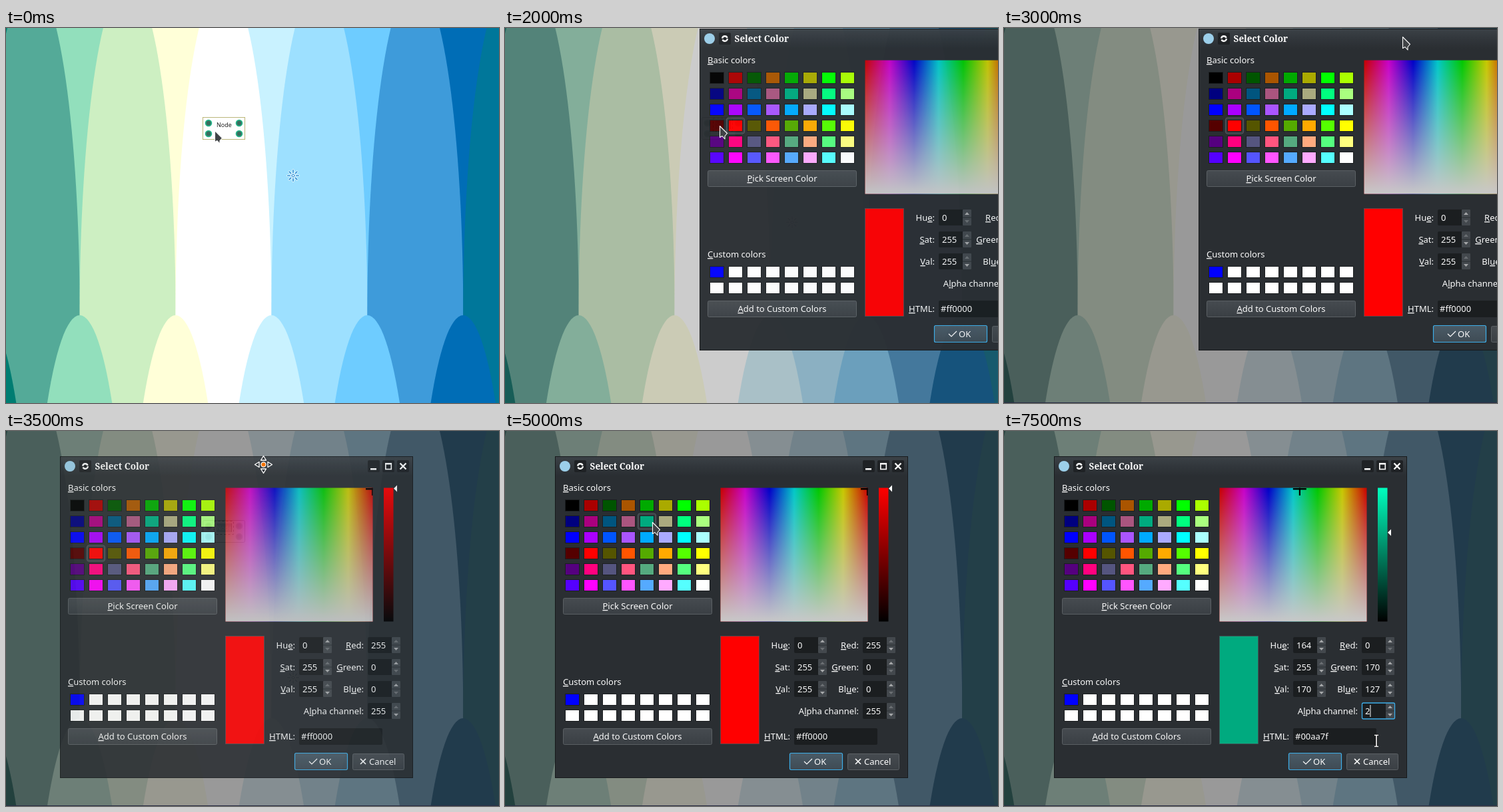
Animation, 740 px wide and 564 px high, one loop 8000 ms. Source, as an HTML page:

```html
<!DOCTYPE html>
<html>
<head>
<meta charset="utf-8">
<style>
  html, body { margin: 0; width: 100%; height: 100%; overflow: hidden; background: #fff; }
  svg { display: block; font: 13px "Noto Sans", sans-serif; }
  u, .u { text-decoration: underline; }
</style>
</head>
<body>
<svg id="stage" width="740" height="564" viewBox="0 0 740 564"></svg>
<script>
const stage = document.getElementById('stage');
const STEP = 500, STEPS = 16;
const TEXT = '#fcfcfc', EDGE = '#1b1e20', FOCUS = '#3daee9';

// Pointer for each step: x, y, kind
const pointers = [
  [313, 154], [313, 154], [318, 138], [322, 147], [322, 147], [622, 0],
  [598, 13], [386.5, 50.5, 'move'], [382, 50], [221, 137], [221, 137],
  [424, 503], [440, 543], [560, 421, 'beam'], [559, 466, 'beam'], [559, 466, 'beam']
];

const range = (n, f) => Array.from({ length: n }, (_, i) => f(i)).join('');
const rect = (x, y, w, h, fill, more = '') =>
  `<rect x="${x}" y="${y}" width="${w}" height="${h}" fill="${fill}" ${more}/>`;
const path = (d, fill, more = '') => `<path d="${d}" fill="${fill}" ${more}/>`;
const line = (d, color, width) => path(d, 'none', `stroke="${color}" stroke-width="${width}"`);
const circle = (x, y, r, fill, more = '') => `<circle cx="${x}" cy="${y}" r="${r}" fill="${fill}" ${more}/>`;
const group = (attrs, body) => `<g ${attrs}>${body}</g>`;
const gradient = (id, vertical, stops) =>
  `<linearGradient id="${id}" x2="${vertical ? 0 : 1}" y2="${vertical ? 1 : 0}">` +
  stops.map((c, i) => `<stop offset="${i / (stops.length - 1)}" stop-color="${c}"/>`).join('') +
  '</linearGradient>';

// "&" marks the underlined letter
const text = (x, y, s, anchor = 'start', more = '') =>
  `<text x="${x}" y="${y}" fill="${TEXT}" text-anchor="${anchor}" ${more}>` +
  s.replace(/&(.)/, '<tspan class="u">$1</tspan>') + '</text>';

function wallpaper() {
  const back = ['#007d72', '#92dfbc', '#ffffd8', '#c9f2ff', '#6eccff', '#006db6'];
  const front = ['#54aa98', '#cdefc2', '#ffffff', '#9de0ff', '#3e9bda', '#00779a'];
  const scale = (x, top, fill) =>
    path(`M${x - 72} 1000V${top + 502}A72 502 0 0 1 ${x + 72} ${top + 502}V1000Z`, fill);
  const row = (colors, x, top) => colors.map((c, i) => scale(x + 143.9 * i, top, c)).join('');
  return row(back, -33.3, -572) + row(front, 38.7, -70) + row(back, -33.3, 432);
}

function node(editing) {
  const frame = (stroke, more) => rect(295.5, 134.5, 63, 33, '#fff', `stroke="${stroke}" ${more}`);
  const dots = [304, 350].map(x => [143, 159].map(y =>
    circle(x, y, 4.4, '#386b5c', 'stroke="#23b68a" stroke-width="1.8"')).join('')).join('');
  const label = color => text(316, 149, 'Node', 'start', `style="font-size:9px;fill:${color}"`);
  if (!editing)
    return frame('#ffee00', '') + frame('#777', 'stroke-dasharray="1 1"') + dots + label('#222');
  return frame('#555', 'rx="2"') + dots +
    rect(312.5, 135.5, 29, 20, '#fff', 'stroke="#000" stroke-dasharray="3 3"') +
    rect(316, 139, 22, 13, FOCUS) + label('#fff') + rect(338, 139, 1, 13, '#000');
}

function spinner(y) {
  const petals = (color, width) => range(8, i =>
    `<path d="M0 -4.8V-8.2" stroke="${color}" stroke-width="${width}" stroke-linecap="round" transform="rotate(${i * 45})"/>`);
  return group(`transform="translate(431 ${y})"`,
    petals('#fff', 3.2) + petals('#2d8fd5', 1.7) +
    path('M0 -3.4L3.4 0L0 3.4L-3.4 0Z', '#2d8fd5', 'stroke="#fff" stroke-width=".8"') + circle(0, 0, 1.2, '#fff'));
}

function swatch(col, row, top, fill, selected) {
  const x = 101 + 28 * col, y = top + 24 * row;
  return (selected ? rect(x - 13.5, y - 12, 27, 24, '#3a4045', 'rx="3" stroke="#555b60"') : '') +
    rect(x - 10.5, y - 8.5, 21, 17, fill, `stroke="${EDGE}"`);
}

function basicColor(i) {
  const r = Math.floor(i / 3) % 4, g = Math.floor(i / 12), b = i % 3;
  return `rgb(${r * 85},${g * 85},${Math.floor(b * 127.5)})`;
}

const button = (x, y, w, h, more = 'stroke="#5b6064"') => rect(x + .5, y + .5, w - 1, h - 1, 'url(#button)', `rx="2" ${more}`);

function spinBox(label, right, y, value, max, focused) {
  const x = right ? 537 : 434;
  const arrow = (ay, d, on) => path(`M${x + 39} ${ay}h7l-3.5 ${d}z`, on ? '#a6a8aa' : '#6b6f73');
  return text(x - 6, y + 5, label, 'end') +
    rect(x, y - 12, 49, 24, EDGE, 'rx="2"') +
    rect(x + 36, y - 12, 13, 24, '#43484d', 'rx="1"') + rect(x + 36, y - .5, 13, 1, '#2a2e32') +
    arrow(y - 4, -4, value !== String(max)) + arrow(y + 4, 4, value !== '0') +
    (focused ? rect(x + .5, y - 12, 49, 24, 'none', `rx="2" stroke="${FOCUS}" stroke-width="1.3"`) +
      rect(x + 5 + 7.43 * value.length, y - 9, 1, 18, TEXT) : '') +
    text(x + 5, y + 5, value);
}

function titleBar() {
  const box = x => rect(x, 44, 18, 18, '#1f2225', 'rx="2"');
  return rect(76, 39, 528, 29, 'url(#title)') +
    circle(90, 53, 8, '#9ccfea') +
    box(104) + circle(113, 53, 3.8, 'none', 'stroke="#fff" stroke-width="2.4" stroke-dasharray="10 2"') +
    text(127.5, 58, 'Select Color', 'start', 'style="font:bold 13.5px \'Noto Serif\',serif"') +
    box(537) + box(559) + box(581) +
    rect(541, 56, 9, 2.5, '#fff') +
    rect(563.8, 49, 8.5, 8.5, 'none', 'stroke="#fff" stroke-width="1.6"') + rect(563, 48, 10, 2.5, '#fff') +
    line('M585.5 48.5l9 9m0-9l-9 9', '#fff', 2.4);
}

function picker(teal) {
  const x = teal ? 443.8 : 544, mark = teal ? 152.7 : 86.5;
  return rect(323.5, 85.5, 221, 201, 'url(#hue)') + rect(323.5, 85.5, 221, 201, 'url(#grey)') +
    group('clip-path="url(#pickClip)"', rect(x - 10, 86, 20, 2.4, '#000') + rect(x - 1, 77, 2.2, 20, '#000')) +
    rect(561, 85.5, 14.5, 201, 'url(#value)') +
    path(`M576 ${mark}l5 -5v10z`, '#fff') +
    rect(323.5, 308.5, 58, 162, teal ? '#00aa7f' : '#f00', 'stroke="#50555a" stroke-width=".7"');
}

function dialog(s) {
  const teal = s >= 11;
  const picked = s < 10 ? 9 : s < 13 ? 25 : -1;
  const alpha = ['255', '25', '2'][Math.max(0, s - 13)];
  const [hue, val, red, green, blue] = teal ? ['164', '170', '0', '170', '127'] : ['0', '255', '255', '0', '0'];
  return '<defs>' +
    gradient('title', true, ['#3b4146', '#31363b', '#2a2e32']) +
    gradient('button', true, ['#464b50', '#3a3f44']) +
    gradient('ok', true, ['#4a5b67', '#3f4b54']) +
    gradient('hue', false, ['#c80000', '#c800c8', '#0000c8', '#00c8c8', '#00c800', '#c8c800', '#c80000']) +
    gradient('grey', true, ['rgba(200,200,200,0)', '#c8c8c8']) +
    gradient('value', true, [teal ? '#00ffbe' : '#f00', '#000']) +
    '<clipPath id="pickClip"><rect x="323.5" y="85.5" width="221" height="201"/></clipPath></defs>' +
    rect(75.5, 38.5, 529, 483, '#2a2e32', 'stroke="#171a1c"') + titleBar() +
    text(87, 90, '&Basic colors') +
    range(48, i => swatch(Math.floor(i / 6), i % 6, 112, basicColor(i), i === picked)) +
    button(87, 251, 224, 25) + text(199, 268, '&Pick Screen Color', 'middle') +
    text(87, 382, '&Custom colors') +
    range(16, i => swatch(i % 8, i >> 3, 404, i ? '#fff' : '#00f')) +
    button(87, 447, 224, 25) + text(199, 464, '&Add to Custom Colors', 'middle') +
    picker(teal) +
    spinBox('Hu&e:', false, 322, hue, 359) +
    spinBox('&Sat:', false, 355, '255', 255) +
    spinBox('&Val:', false, 388, val, 255) +
    spinBox('&Red:', true, 322, red, 255) +
    spinBox('&Green:', true, 355, green, 255) +
    spinBox('Bl&ue:', true, 388, blue, 255) +
    spinBox('A&lpha channel:', true, 421, alpha, 255, s >= 13) +
    text(428, 464, '&HTML:', 'end') + rect(434, 447, 125, 25, EDGE, 'rx="2"') +
    text(437, 464, teal ? '#00aa7f' : '#ff0000') +
    rect(427.5, 484.5, 79, 25, 'url(#ok)', `rx="2" stroke="${FOCUS}" stroke-width="1.2"`) +
    line('M449 497l4 4l8 -8', TEXT, 1.2) + text(464, 502, 'OK') +
    button(514, 485, 78, 25) + line('M526 493l8 8m0-8l-8 8', TEXT, 1.7) + text(539, 502, 'Cancel');
}

function pointer([x, y, kind]) {
  let shape;
  if (kind === 'move')
    shape = range(4, i => path('M0 -13L4 -6.5H-4Z', '#31363b',
      `stroke="#fff" stroke-width="1.3" stroke-linejoin="round" transform="rotate(${i * 90})"`)) +
      circle(0, 0, 3.6, '#f67400', 'stroke="#fff" stroke-width="1.2"');
  else if (kind === 'beam') {
    const d = 'M-3 -8.5H3M0 -8.5V8.5M-3 8.5H3';
    shape = line(d, '#111', 3.6) + line(d, '#fff', 1.6);
  } else
    shape = path('M.5 .5V17.5L4 15.5L8 20V15.5L11.5 11.5Z', '#404346',
      'stroke="#fcfcfc" stroke-width="1.1" stroke-linejoin="round"');
  return group(`transform="translate(${x} ${y})"`, shape);
}

function scene(s) {
  const dim = s < 4 ? 0 : s === 4 ? .5 : 1;
  const spinY = [222, 228, 246][s] ?? Math.min(371, 266 + 26.25 * (s - 3));
  const opacity = { 4: .96, 7: .87, 8: .97 }[s] ?? 1;
  const [dx, dy] = s < 7 ? [217, -37] : s === 7 ? [6, 0] : [0, 0];
  const filter = dim ? `style="filter:saturate(${1 - .6 * dim}) brightness(${1 - .4 * dim})"` : '';
  return group(filter, wallpaper() + node(s >= 3) + spinner(spinY)) +
    (dim === 1 ? rect(0, 563, 740, 1, '#2b2e45') : '') +
    (s >= 4 ? group(`transform="translate(${dx} ${dy})" opacity="${opacity}"`, dialog(s)) : '') +
    pointer(pointers[s]);
}

let shown = -1;
function draw() {
  const s = Math.floor(performance.now() / STEP) % STEPS;
  if (s !== shown) stage.innerHTML = scene(shown = s);
  requestAnimationFrame(draw);
}
draw();
</script>
</body>
</html>
```
